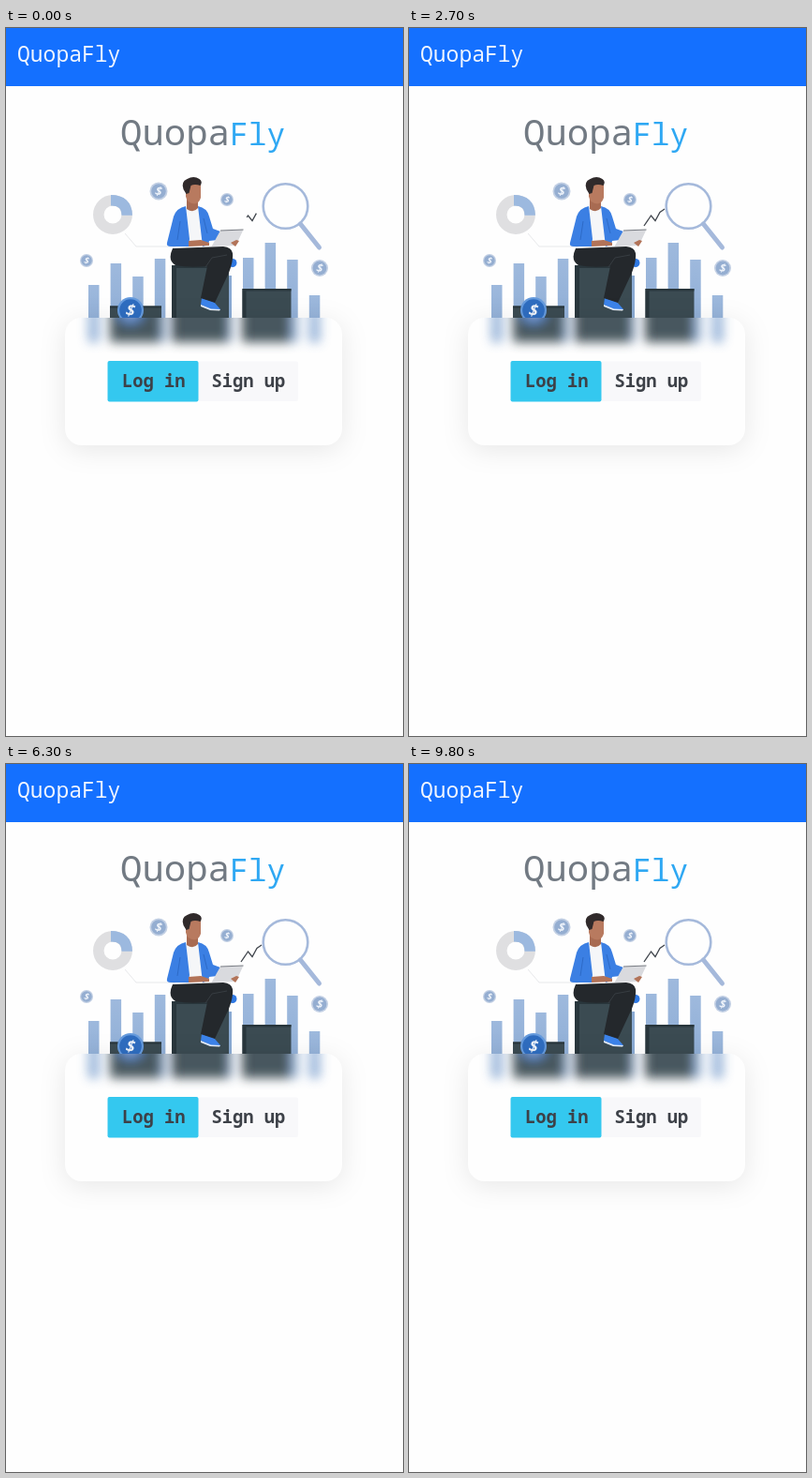
These frames come from a looping animation (424x755 px, 9900 ms). An HTML page:

```html
<!DOCTYPE html>
<html lang="en">
<head>
<meta charset="utf-8">
<title>QuopaFly</title>
<style>
  html, body { margin: 0; width: 100%; height: 100%; overflow: hidden; background: #fefefe; }
  svg { display: block; width: 424px; height: 755px; }
  text { font-family: "Noto Sans Mono", "DejaVu Sans Mono", monospace; }
  .name { font-size: 23px; font-weight: 300; fill: #f0f5ff; }
  .title { font-size: 39px; font-weight: 200; fill: #727a83; }
  .title .end { font-size: 33px; font-weight: 300; fill: #2fa8f3; }
  .label { font-size: 18.8px; font-weight: 600; fill: #3d4148; }
  .card { fill: #fefefe; filter: drop-shadow(0 5px 14px rgba(0, 0, 0, .09)); }
  .coin text { font: italic 700 1.5px "Open Sans", sans-serif; fill: #eef3fa; text-anchor: middle; }
  .hazy { filter: blur(.5px); }
</style>
</head>
<body>
<svg viewBox="0 0 424 755">
  <defs>
    <linearGradient id="barFill" x2="0" y2="1">
      <stop stop-color="#9eb9dd"/><stop offset="1" stop-color="#8babd4"/>
    </linearGradient>
    <filter id="frost" x="-10%" y="-10%" width="120%" height="130%"><feGaussianBlur stdDeviation="6"/></filter>
    <clipPath id="cardClip"><rect x="63" y="309" width="296" height="136" rx="18"/></clipPath>
  </defs>

  <rect width="424" height="62" fill="#1470ff"/>
  <text class="name" x="12" y="36">QuopaFly</text>
  <text class="title" x="122" y="125">Quopa<tspan class="end">Fly</tspan></text>

  <g class="hazy">
    <g class="drift">
      <g fill="none" stroke-width="11.5">
        <circle cx="114" cy="199" r="15.2" stroke="#dfdfe1"/>
        <path d="M112 183.800q17 0 17.200 16" stroke="#9cb9df"/>
      </g>
      <path d="M127 219l12 14h42" fill="none" stroke="#e7e8ea"/>
      <g fill="none" stroke="#a5b9db">
        <circle cx="298.500" cy="190" r="23.800" stroke-width="2.600"/>
        <path d="M314.500 209l20 25" stroke-width="5" stroke-linecap="round"/>
      </g>
      <g id="coins"></g>
    </g>

    <g id="base">
      <g class="drift" id="bars" fill="url(#barFill)"></g>
      <path d="M230 264h11v71h-11z" fill="#8babd4"/>
      <path d="M111 296.500h55v38.500h-55zM252.500 278h52v57h-52zM177 253h61v82h-61z" fill="#3b4b52"/>
      <path d="M111 296.500h55v2h-55zM252.500 278h52v2.500h-52zM252.500 278h4v57h-4zM177 253h61v3h-61zM177 253h5v82h-5z" fill="#29363c"/>
      <g class="coin" transform="translate(133 301)">
        <circle r="14" fill="#669bdd"/><circle r="11.800" fill="#2f6dc0"/>
        <text transform="scale(11.500) rotate(10)" y=".52">$</text>
      </g>
    </g>

    <circle cx="242" cy="250.500" r="4.500" fill="#2f78e2"/>
    <path d="M209 288l13 4 7 8q-2 2-10 0l-11-5z" fill="#3c83ea"/>
    <path d="M208 295l11 4.500 10 .5-1 1.500-10-.5-10-4z" fill="#e6eefb"/>
    <path d="M178 235q-6 13 3 18 14 3 34 1l-7 34 15 5 15-32q5-13 4-21-1-6-10-7z" fill="#24282c"/>
    <path d="M213 255l7-10 16-3" fill="none" stroke="#373d42"/>
    <path d="M192 191h15l4 36-2 7h-17z" fill="#f5f6f8"/>
    <path d="M193 181h12v11q-5 6-12 1z" fill="#a86b52"/>
    <path d="M192 190q-10 2-13 11l-7 28q-1 4 4 4h19l1-8zM205 190q10 2 12 11l4 13 8 3-3 9-9 1-1 4-6 2z" fill="#3b7fe3"/>
    <path d="M186 206l-3 20M211 203l4 16" fill="none" stroke="#2a65bf" stroke-width=".8"/>
    <path d="M195 227l13-1 9 3v3l-22 1z" fill="#b27358"/>
    <path d="M192 167q7-5 16 0v14q-2 6-7 6.500-8-1-9-8z" fill="#b87a5f"/>
    <path d="M189.500 172q-3-8 4-11 7-4 13 0 4 3 1 7-6-2-10 0l-2 8-3 1z" fill="#302a2b"/>
    <path d="M229 216l24.500-1-8 17-26 1z" fill="#d9dade"/>
    <path d="M229 216l24.500-1" stroke="#777b82"/>
    <path d="M240 229l6-3 3 1-4 6z" fill="#b27358"/>
    <path id="trend" d="M251 211l7.500-11 4.500 5.500 5-9 5-3.500" pathLength="1"
          fill="none" stroke="#41464d" stroke-width="1.300"/>
  </g>

  <rect class="card" x="63" y="309" width="296" height="136" rx="18"/>
  <g clip-path="url(#cardClip)"><use href="#base" filter="url(#frost)" opacity=".93"/></g>
  <g class="hazy">
    <rect x="205" y="355.500" width="107" height="42.500" rx="2" fill="#f8f8fa"/>
    <rect x="108.500" y="355" width="97" height="43.500" rx="2" fill="#34c8ef"/>
    <text class="label" x="124" y="382.500">Log in</text>
    <text class="label" x="219.500" y="382.500">Sign up</text>
  </g>
  <circle id="touch" cx="181" r="15" fill="#929292" stroke="#858585" stroke-width=".6"/>
</svg>
<script>
  const LOOP = 9900, CYCLE = 4400, STEP = 100, FLOOR = 335;
  const $ = id => document.getElementById(id);

  function add(parent, tag, attrs) {
    const el = document.createElementNS("http://www.w3.org/2000/svg", tag);
    for (const key in attrs) el.setAttribute(key, attrs[key]);
    return parent.appendChild(el);
  }

  // Smooth 0 to 1 between times a and b.
  function ease(t, a, b) {
    const p = Math.min(1, Math.max(0, (t - a) / (b - a)));
    return p * p * (3 - 2 * p);
  }

  // Two charts of bar tops that trade places: four bars on each side of the seat.
  const usual = [274, 251, 265, 246, 245, 229, 247, 285];
  const other = [262, 300, 249, 267, 240, 285, 265, 294];
  const bars = usual.map((_, i) =>
    add($("bars"), "rect", { x: (i < 4 ? 88 : 253) + i % 4 * 23.6, width: 11.5 }));

  for (const [x, y, r] of [[163, 174, 9.5], [236, 183, 7], [86, 248, 7], [335, 256, 9]]) {
    const g = add($("coins"), "g", { class: "coin", transform: `translate(${x} ${y}) scale(${r})` });
    add(g, "circle", { r: 1, fill: "#c3d0e4" });
    add(g, "circle", { r: .82, fill: "#95aed1" });
    add(g, "text", { y: .52, transform: "rotate(10) scale(.9)" }).textContent = "$";
  }

  const drifts = document.querySelectorAll(".drift");
  const trims = [0, 5000, 8300];

  function draw() {
    const t = Math.floor(performance.now() % LOOP / STEP) * STEP, phase = t % CYCLE;

    const swap = ease(phase, 2900, 3500) - ease(phase, 4100, 4400);
    bars.forEach((bar, i) => {
      const y = usual[i] + (other[i] - usual[i]) * swap;
      bar.setAttribute("y", y);
      bar.setAttribute("height", FLOOR - y);
    });
    drifts.forEach(g => g.setAttribute("transform", `translate(${swap})`));

    // The trend line shrinks from both ends and grows back.
    const trim = Math.max(...trims.map(at => 1 - ease(Math.abs(t - at), 0, 700)));
    const from = .3 * trim, to = 1 - .2 * trim;
    $("trend").setAttribute("stroke-dasharray", `0 ${from} ${to - from} 2`);

    $("touch").setAttribute("cy", 590 + 4 * ease(t, 2800, 3300));
    $("touch").setAttribute("visibility", t >= 2800 && t < 5700 ? "visible" : "hidden");
    requestAnimationFrame(draw);
  }
  draw();
</script>
</body>
</html>
```
